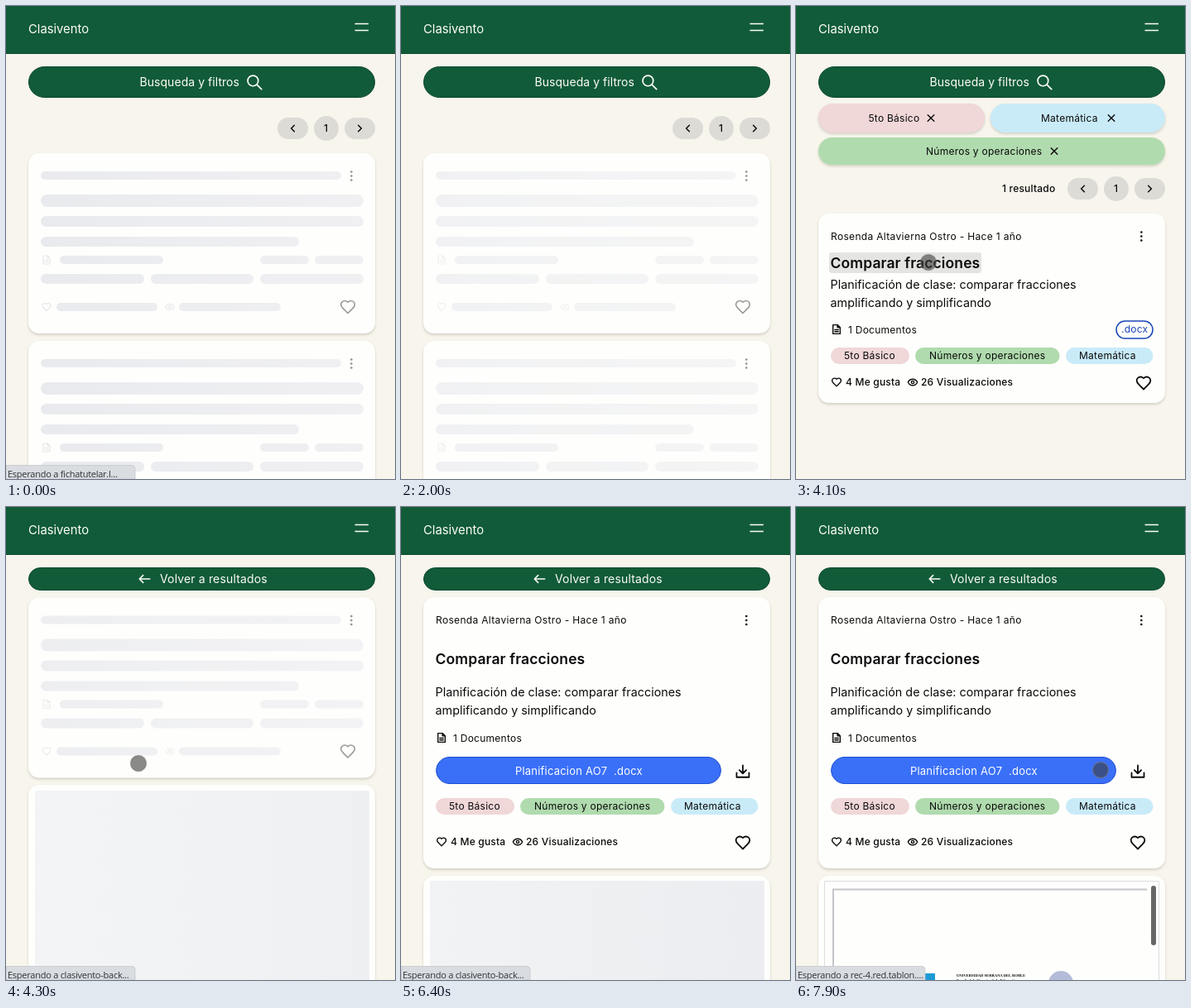
Write an HTML page that moves like this. It is 470 px wide and 572 px high and loops after 8000 ms.

```html
<!DOCTYPE html>
<html lang="es">
<head>
<meta charset="utf-8">
<title>Planificaciones</title>
<style>
  html, body { margin: 0; width: 100%; height: 100%; overflow: hidden; background: #f7f5ec; }
  svg { display: block; width: 470px; height: 572px; }
  text { font-family: Inter, "Open Sans", sans-serif; white-space: pre; }
  .status { font-family: "Open Sans", "Noto Sans", sans-serif; }
  .serif { font-family: "Liberation Serif", "Noto Serif", serif; }
</style>
</head>
<body>
<svg id="stage" viewBox="0 0 470 572">
  <defs>
    <linearGradient id="bone" gradientUnits="userSpaceOnUse" x1="42" x2="432" y1="0" y2="0">
      <stop offset="0" stop-color="#e9eaee"/>
      <stop offset=".4" stop-color="#ecedf0"/>
      <stop offset="1" stop-color="#f0f0f3"/>
    </linearGradient>
    <linearGradient id="pane">
      <stop offset="0" stop-color="#f0f1f3"/>
      <stop offset="1" stop-color="#e9ebef"/>
    </linearGradient>
    <filter id="shadow" x="-10%" y="-20%" width="120%" height="150%" color-interpolation-filters="sRGB">
      <feDropShadow dx="0" dy="1.8" stdDeviation="1.5" flood-color="#5a5848" flood-opacity=".24"/>
    </filter>
  </defs>
</svg>
<script>
const LOOP = 8000, STEP = 100;
const GREEN = '#115b38', INK = '#0a0a0a', WHITE = '#fdfdf6', PALE = '#fefefc';
const PINK = '#f0d7d8', SKY = '#c9ebf8', LEAF = '#b0dbae';

const ICONS = {
  heart: 'M19 14c1.5-1.46 3-3.2 3-5.5A5.5 5.5 0 0 0 16.5 3c-1.76 0-3 .5-4.5 2-1.5-1.5-2.74-2-4.5-2A5.5 5.5 0 0 0 2 8.5c0 2.3 1.5 4 3 5.5l7 7Z',
  eye: 'M1.5 12C4 7 8 5 12 5s8 2 10.5 7C20 17 16 19 12 19S4 17 1.5 12ZM9 12a3 3 0 1 0 6 0a3 3 0 1 0-6 0',
  doc: 'M14 2H4v20h16V8ZM14 2v6h6M8 13h8M8 17h8',
  cross: 'M5 5L19 19M19 5L5 19',
  left: 'M15 6L9 12L15 18',
  right: 'M9 6L15 12L9 18',
  back: 'M22 12H2M9 5L2 12L9 19',
  search: 'M2 10a8 8 0 1 0 16 0a8 8 0 1 0-16 0M16 16L23 23',
  load: 'M12 2v13M6.5 9.5L12 15L17.5 9.5M2 14v7h20v-7'
};

const rect = (x, y, w, h, r, fill, more = '') =>
  `<rect x="${x}" y="${y}" width="${w}" height="${h}" rx="${r}" fill="${fill}" ${more}/>`;
const text = (s, x, y, size = 12, { fill = INK, weight = 400, gap = .25, cls = '' } = {}) =>
  `<text x="${x}" y="${y}" font-size="${size}" font-weight="${weight}" letter-spacing="${gap}" fill="${fill}" class="${cls}">${s}</text>`;
const icon = (name, cx, cy, size, color = INK, width = 1.5) =>
  `<path d="${ICONS[name]}" transform="translate(${cx - size / 2} ${cy - size / 2}) scale(${size / 24})"
    fill="none" stroke="${color}" stroke-width="${width * 24 / size}" stroke-linecap="round" stroke-linejoin="round"/>`;
const group = (id, ...parts) => `<g id="${id}">${parts.join('')}</g>`;
const card = (y, h) => rect(27, y, 419, h, 13, PALE, 'filter="url(#shadow)"');
const button = (x, y, w, h, fill, edge) =>
  rect(x + .5, y + .5, w - 1, h - 1, h / 2, fill, `stroke="${edge}"`);
const dots = (y, color) => [-5, 0, 5].map(d =>
  `<circle cx="417.3" cy="${y + d}" r="1.3" fill="${color}"/>`).join('');

// Bars of an empty card: x, y, width, height
const BARS = [
  [42, 22, 363, 10], [42, 50, 390, 15], [42, 76, 390, 13], [42, 101, 312, 12],
  [65, 124, 125, 10], [307, 124, 59, 10], [373, 124, 59, 10],
  [42, 146, 125, 12], [175, 146, 124, 12], [307, 146, 125, 12],
  [61, 181, 122, 10], [209, 181, 123, 10]
];
const bones = y => card(y, 218) +
  '<g class="pulse">' +
  BARS.map(([x, dy, w, h]) => rect(x, y + dy, w, h, h / 2, 'url(#bone)')).join('') +
  icon('doc', 49, y + 129, 12, '#e6e7e9', 1.2) +
  icon('heart', 49, y + 186, 12, '#e6e7e9', 1.2) +
  icon('eye', 198, y + 186, 12, '#e6e7e9', 1.2) + '</g>' +
  dots(y + 27.5, '#8e8e8e') + icon('heart', 413, y + 186, 20, '#999', 1.6);
const pane = (y, h) =>
  '<g class="pulse">' + rect(35, y, 404, h, 2, 'url(#pane)') + '</g>';

const pager = y =>
  rect(328, y - 13, 37, 26, 13, '#dcdbd6') + icon('left', 346.5, y, 15, INK, 1.5) +
  `<circle cx="387" cy="${y}" r="15" fill="#dcdbd6"/>` +
  text('1', 384, y + 4, 12, { weight: 500, gap: 0 }) +
  rect(409, y - 13, 37, 26, 13, '#dcdbd6') + icon('right', 427.5, y, 15, INK, 1.5);

const chip = (x, y, w, h, fill, label, tx, cross) =>
  rect(x, y, w, h, h / 2, fill, 'filter="url(#shadow)"') +
  text(label, tx, y + h / 2 + 4) + icon('cross', cross, y + h / 2, 13, INK, 1.4);
const tag = (x, y, w, fill, label, tx) =>
  rect(x, y, w, 20, 10, fill) + text(label, tx, y + 14);
const tags = y =>
  tag(42, y, 95, PINK, '5to Básico', 58) +
  tag(144, y, 174.5, LEAF, 'Números y operaciones', 161) +
  tag(326, y, 105.5, SKY, 'Matemática', 342);

const author = y => text('Rosenda Altavierna Ostro - Hace 1 año', 42, y + 4, 12, { gap: .33 }) + dots(y, INK);
const heading = y => text('Comparar fracciones', 41.5, y + 6, 17.5, { weight: 600, gap: .12 });
const summary = y =>
  text('Planificación de clase: comparar fracciones', 41.5, y + 5, 14.3, { gap: .04 }) +
  text('amplificando y simplificando', 41.5, y + 27, 14.3, { gap: .04 });
const files = y => icon('doc', 49, y, 13, INK, 1.4) + text('1 Documentos', 63, y + 4.5);
const counts = (y, hx) =>
  icon('heart', 49, y, 13, INK, 1.4) + text('4 Me gusta', 60, y + 4, 12, { weight: 500, gap: .2 }) +
  icon('eye', 141, y, 13, INK, 1.4) + text('26 Visualizaciones', 151, y + 4, 12, { weight: 500, gap: .2 }) +
  icon('heart', hx, y + 1, 20, INK, 1.8);

const header =
  rect(0, 0, 470, 58, 0, GREEN) + rect(0, 57, 470, 1, 0, '#0d4a2d') +
  text('Clasivento', 27, 33, 14.8, { fill: WHITE, gap: 0 }) +
  `<path d="M421.5 21.5H438M421.5 29.5H438" stroke="${WHITE}" stroke-width="1.6"/>`;

const searchBar = button(27, 73, 419, 38, GREEN, '#0b472a') +
  text('Busqueda y filtros', 161.5, 97, 14, { fill: WHITE, gap: .05 }) +
  icon('search', 300, 92, 19, WHITE, 1.7);

const results =
  chip(27, 118, 201, 35, PINK, '5to Básico', 87.5, 163) +
  chip(235, 118, 211, 35, SKY, 'Matemática', 296, 381) +
  chip(27, 159, 419, 33, LEAF, 'Números y operaciones', 157, 312) +
  text('1 resultado', 249, 225, 12, { weight: 500, gap: .2 }) + pager(221) +
  card(251, 229) + author(278.5) +
  rect(40, 298, 184, 25, 3, '#000', 'id="tap" opacity=".1"') +
  heading(311) + summary(337) + files(391) +
  rect(387, 381, 44, 21, 10.5, 'none', 'stroke="#1a46b8" stroke-width="1.5"') +
  text('.docx', 393, 395, 12, { fill: '#1a46b8' }) +
  tags(413) + counts(455, 420);

const backBar = button(27, 73, 419, 28, GREEN, '#0b472a') + icon('back', 167.5, 87, 15, WHITE, 1.6) +
  text('Volver a resultados', 186, 92, 14, { fill: WHITE, gap: .15 });

const detail =
  card(109, 328) + author(137) + heading(184) + summary(224) + files(279) +
  button(42, 302, 345, 33, '#3a6ff8', '#1f4fd0') +
  text('Planificacion AO7  .docx', 138, 323.5, 13, { fill: '#fff', gap: .2 }) +
  icon('load', 413, 320, 18, INK, 1.8) +
  tags(352) + counts(405, 413) + card(446, 150);

const sheet =
  '<path d="M34.5 572V452.5H438.5V572" fill="none" stroke="#dcdde0"/>' +
  '<path d="M45 572V462.5H424" fill="none" stroke="#c3c5c9" stroke-width="2"/>';
const letterhead =
  rect(155, 564, 13, 13, 0, '#1d9ad6') +
  text('UNIVERSIDAD SERRANA DEL ROBLE', 194, 568, 4.6, { weight: 700, gap: 0, cls: 'serif' }) +
  text('Facultad de Ciencias de la Educación', 194, 573.5, 4.6, { weight: 700, gap: 0, cls: 'serif' }) +
  '<circle cx="320" cy="576" r="15" fill="#b4bcd9"/>' +
  rect(429, 458, 6, 72, 3, '#666');

const stage = document.getElementById('stage');
stage.innerHTML += header +
  group('list', searchBar,
    group('listBones', pager(148), bones(178), bones(405)),
    group('results', results)) +
  group('open', backBar,
    group('openBones', bones(109.5), card(336, 260), pane(343, 240)),
    group('detail', detail,
      group('docBones', pane(452, 130)),
      group('sheet', sheet), group('letterhead', letterhead))) +
  group('status',
    '<path d="M0 555.5H152Q156 555.5 156 559.5V572H0Z" fill="#d9dce0" stroke="#c4c7cb" stroke-width=".8"/>',
    text('', 2, 570, 11, { fill: '#2f3336', gap: -.25, cls: 'status' })) +
  '<circle id="touch" r="9.5" fill="#3c3c3c" fill-opacity=".6" stroke="#777" stroke-opacity=".55" stroke-width="1.5"/>';

const $ = id => document.getElementById(id);
const show = (id, on) => $(id).style.display = on ? '' : 'none';
const pulses = [...document.querySelectorAll('.pulse')];
const message = document.querySelector('.status');

function statusAt(t) {
  if (t < 800) return 'fichatutelar.l...';
  if (t >= 4300 && t < 5000) return 'clasivento-back...';
  if (t >= 6000) return t < 6900 ? 'clasivento-back...' : 'rec-4.red.tablon....';
  return '';
}

function touchAt(t) {
  if (t >= 3600 && t < 4800) {
    const p = Math.min(1, (t - 3600) / 300), e = 1 - (1 - p) ** 2;
    return [56 + 104 * e, 86 + 224 * e];
  }
  return t >= 7800 ? [368, 318] : null;
}

function render(now) {
  const t = Math.floor(now % LOOP / STEP) * STEP;
  const first = t < 4300, found = t >= 2200, loaded = t >= 5500;
  show('list', first);
  show('listBones', !found);
  show('results', found);
  show('tap', t >= 4100);
  show('open', !first);
  show('openBones', !loaded);
  show('detail', loaded);
  show('docBones', t < 6900);
  show('sheet', t >= 7300);
  show('letterhead', t >= 7800);

  // Each screen starts its own pulse
  const origin = first ? 0 : loaded ? 5000 : 4000;
  const level = .6 + .4 * Math.cos((t - origin) / 1600 * 2 * Math.PI);
  for (const p of pulses) p.setAttribute('opacity', level);

  const host = statusAt(t);
  show('status', host);
  message.textContent = 'Esperando a ' + host;

  const at = touchAt(t);
  show('touch', at);
  if (at) $('touch').setAttribute('transform', `translate(${at})`);
}

const start = performance.now();
function tick() {
  render(performance.now() - start);
  requestAnimationFrame(tick);
}
tick();
</script>
</body>
</html>
```
